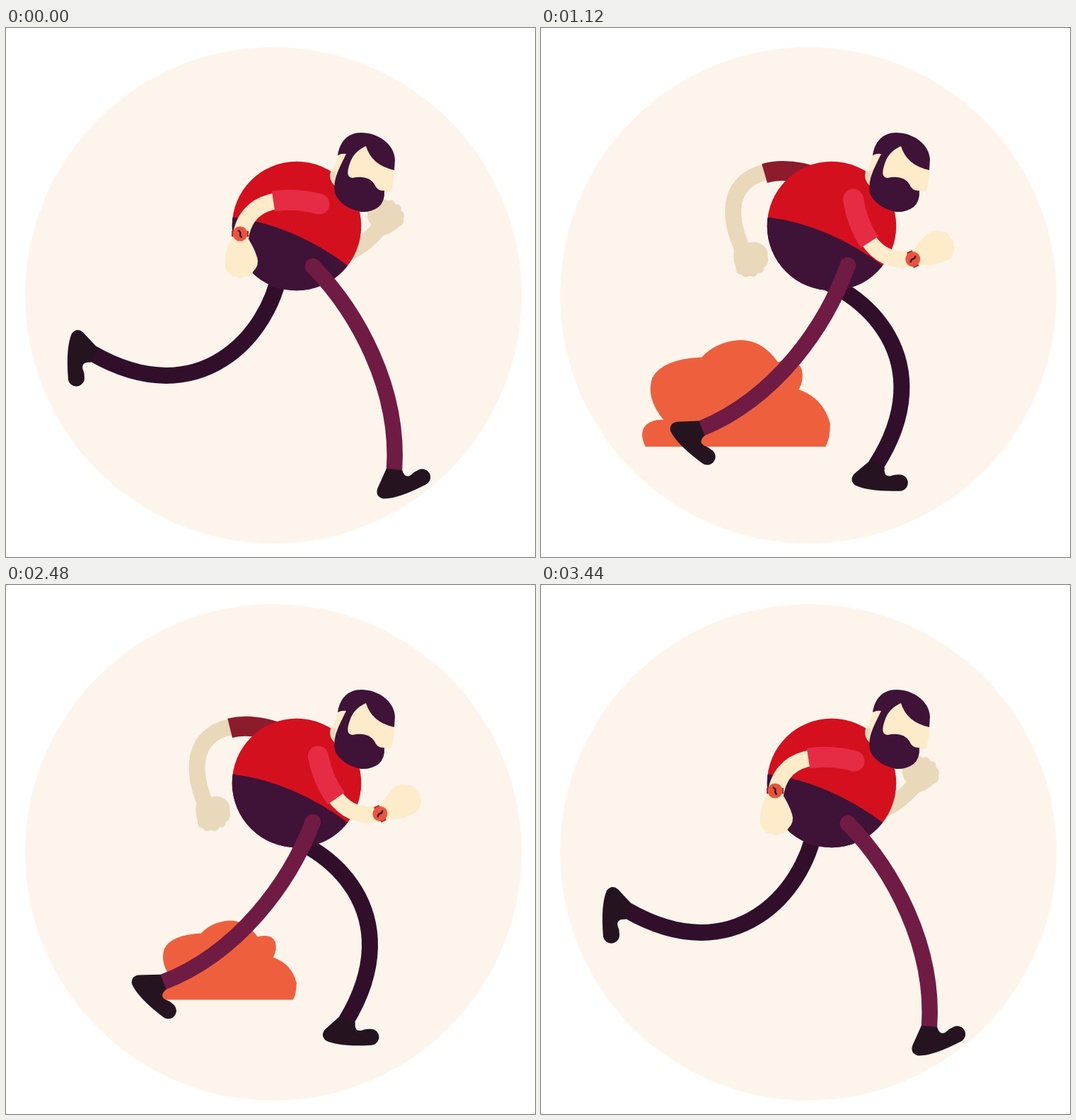
An HTML page with a canvas that plays this animation: 748x748 px, repeating every 3480 ms.

```html
<!DOCTYPE html>
<html lang="en">
<head>
<meta charset="utf-8">
<title>Runner</title>
<style>
html, body { margin: 0; width: 100%; height: 100%; overflow: hidden; background: #fff; }
canvas { display: block; }
</style>
</head>
<body>
<canvas id="stage" width="748" height="748"></canvas>
<script>
const ctx = document.getElementById('stage').getContext('2d');
const FRAME_MS = 40, FRAMES = 87;

const COLOR = {
  ground: '#fdf5ec', bush: '#ee603d', shirt: '#d4101e', dark: '#3f1237',
  nearLeg: '#701b43', farLeg: '#310f2a', shoe: '#251420',
  skin: '#fdebc9', farSkin: '#ead8ba', sleeve: '#e62c45', farSleeve: '#8c1c2b',
  watch: '#e8553c', strap: '#a32a2c'
};

function fill(path, color) {
  ctx.fillStyle = color;
  ctx.fill(new Path2D(path));
}

function stroke(path, width, color) {
  ctx.strokeStyle = color;
  ctx.lineWidth = width;
  ctx.stroke(new Path2D(path));
}

function disc(x, y, r, color) {
  ctx.fillStyle = color;
  ctx.beginPath();
  ctx.arc(x, y, r, 0, 7);
  ctx.fill();
}

// Turns a drawing made in stage coordinates around a joint.
function pivot(x, y, degrees, draw) {
  ctx.save();
  ctx.translate(x, y);
  ctx.rotate(degrees * Math.PI / 180);
  ctx.translate(-x, -y);
  draw();
  ctx.restore();
}

// The ankle is at x, y.
function shoe(x, y, degrees) {
  pivot(x, y, degrees, () => {
    ctx.translate(x, y);
    fill('M-10-5L-32 17Q-39 26-30 33Q-10 41 34 36A11.5 11.5 0 0 0 32 13Q25 13 19 16Q9 18 10 5Z', COLOR.shoe);
  });
}

function nearLeg() {
  disc(434, 337, 11.5, COLOR.nearLeg);
  stroke('M434 337C497 402 557 510 549 625', 22.5, COLOR.nearLeg);
  shoe(549, 624, -21);
}

function farLeg() {
  stroke('M387 345C372 432 275 548 122 460', 23, COLOR.farLeg);
  shoe(125, 463, 92);
}

function nearArm() {
  stroke('M443 250C400 238 338 236 331 300', 23, COLOR.skin);
  fill('M320 297Q309 312 310 336Q310 344 316 346Q318 353 326 351Q332 356 338 351' +
    'Q347 353 349 345Q359 335 355 324Q351 311 342 297Z', COLOR.skin);
  disc(443, 249, 14.5, COLOR.sleeve);
  stroke('M443 249Q411 240 378 245', 29, COLOR.sleeve);
  stroke('M319 291H343', 8, COLOR.strap);
  disc(331, 291, 10.5, COLOR.watch);
  stroke('M328 286Q333 289 331 292Q331 295 334 296', 2.5, COLOR.dark);
}

function farArm() {
  stroke('M397 213C300 180 245 225 285 312', 23, COLOR.farSkin);
  fill('M275 306Q270 325 276 339Q276 349 284 349Q288 355 296 351Q304 355 307 347' +
    'Q316 348 316 339Q324 334 321 323Q322 312 312 306Q303 301 296 304Z', COLOR.farSkin);
  stroke('M397 213Q350 196 316 206', 28, COLOR.farSleeve);
}

function bush(x, y, scale) {
  ctx.save();
  ctx.translate(x, y);
  ctx.scale(scale, scale);
  fill('M0 0Q-8-16 2-24Q9-29 19-28Q0-51 7-72Q17-92 59-94Q74-110 98-112Q122-113 139-89' +
    'Q158-94 164-82Q167-70 161-60Q187-51 194-24Q194-8 189 0Z', COLOR.bush);
  ctx.restore();
}

function torso() {
  ctx.save();
  disc(411, 280, 91.3, COLOR.shirt);
  ctx.clip();
  fill('M316 267Q405 277 486 338L486 380L316 380Z', COLOR.dark);
  ctx.restore();
}

function head() {
  fill('M469 180L484 176L474 212L465 223Q456 215 459 204Q466 195 469 180Z', COLOR.skin);
  fill('M459 203L466 202L465 223Q456 214 459 203Z', COLOR.farSkin);
  fill('M480 185L508 162L549 198Q549 220 544 231L520 232L478 216Z', COLOR.skin);
  fill('M469 180C472 160 484 148 502 148C526 148 549 164 550 186L549 201Q517 194 509 167' +
    'Q494 170 484 192L481 178Q475 177 469 180Z', COLOR.dark);
  fill('M481 178Q494 168 509 167Q491 175 486 192Q479 211 490 212Q512 207 521 221' +
    'Q525 231 535 230Q536 245 527 253Q516 261 502 260Q474 254 465 234Q462 219 470 201Q476 188 481 178Z',
    COLOR.dark);
}

// Stride angle: a slow first stride, a quick catch-up, then a brisker second one.
function stride(frame) {
  if (frame < 38) return 7.37 * frame;
  if (frame < 49) return 280 + 11.8 * (frame - 38);
  return 410 + 8.38 * (frame - 49);
}

function draw(frame) {
  const swing = 46 * (1 - Math.cos(stride(frame) * Math.PI / 180));
  ctx.fillStyle = '#fff';
  ctx.fillRect(0, 0, 748, 748);

  ctx.save();
  disc(378, 378, 351, COLOR.ground);
  ctx.clip();
  bush(752 - 21.58 * frame, 592, 1.346);
  bush(1680 - 23.6 * frame, 586.5, 1);
  ctx.restore();

  pivot(381, 355, -swing, farLeg);
  pivot(397, 219, 1.31 * (swing - 87), farArm);
  torso();
  pivot(435, 336, 0.73 * swing, nearLeg);
  head();
  pivot(440, 246, -1.31 * swing, nearArm);
}

const start = performance.now();
function tick() {
  draw(Math.floor((performance.now() - start) / FRAME_MS) % FRAMES);
  requestAnimationFrame(tick);
}
tick();
</script>
</body>
</html>
```
